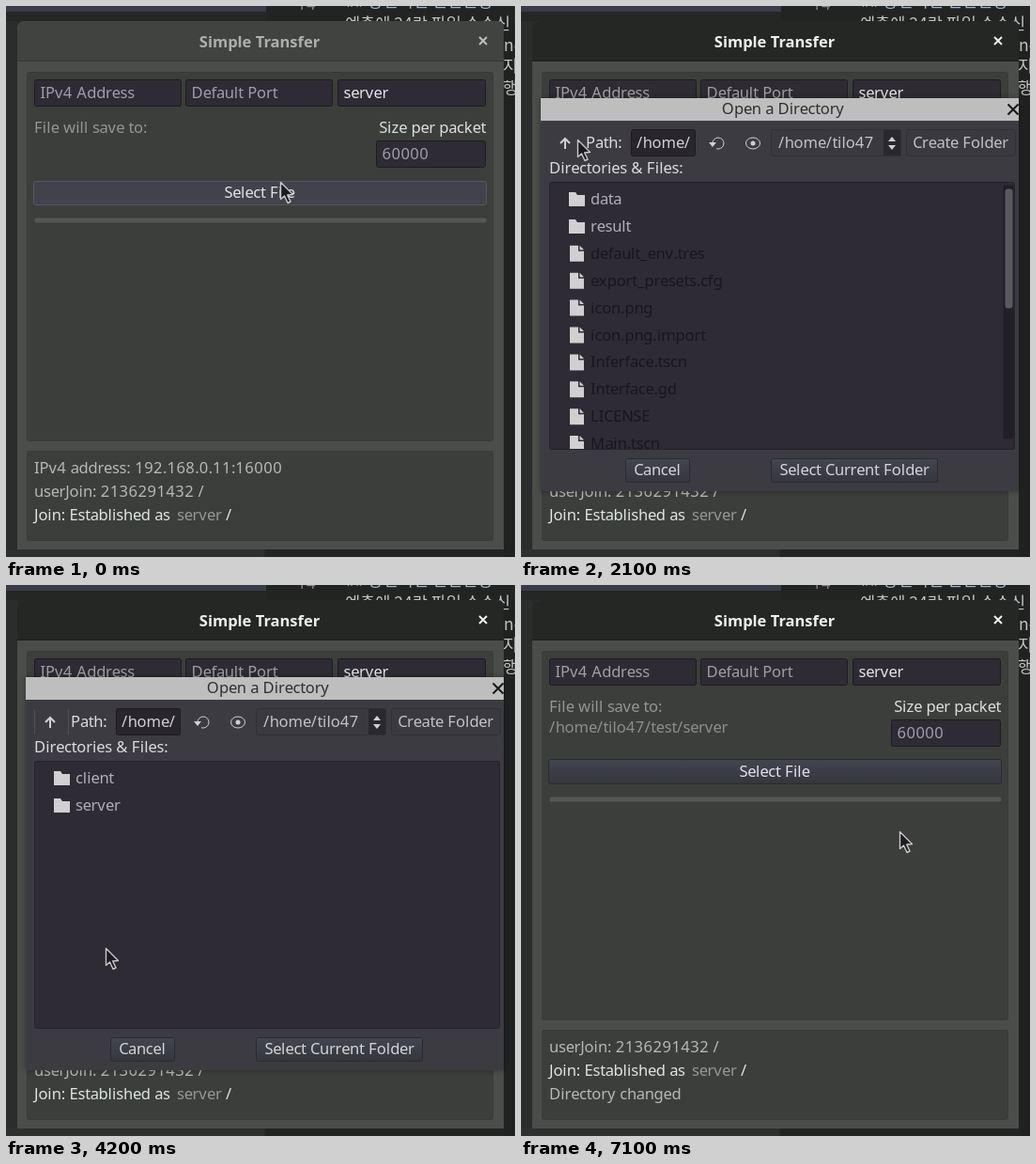
Write an HTML page with a canvas that moves like this. It is 542 px wide and 586 px high and loops after 7.2 s.

```html
<!DOCTYPE html>
<html lang="en">
<head>
<meta charset="utf-8">
<title>Simple Transfer</title>
<style>
html, body { margin: 0; width: 542px; height: 586px; overflow: hidden; background: #252727; }
canvas { display: block; }
</style>
</head>
<body>
<canvas id="stage" width="542" height="586"></canvas>
<script>
const c = document.getElementById('stage').getContext('2d');
const LOOP = 7200, STEP = 100, ROW = 28.9;
const FACE = '"Noto Sans", "Open Sans", sans-serif';
const CJK = '17.5px "Noto Sans CJK KR", "Noto Sans CJK", sans-serif';
const HINT_SIZE = 15, ZOOM = 1.105;
const FONT = `500 ${HINT_SIZE * ZOOM}px ${FACE}`;
const USER = 'tilo47';
const OPEN = 600, CLOSE = 6600;

const projectItems = ['data', 'result', 'default_env.tres', 'export_presets.cfg', 'icon.png',
  'icon.png.import', 'Inferface.tscn', 'Interface.gd', 'LICENSE', 'Main.tscn'];
const homeItems = ['airCraftCarrierTable', 'Android', 'Arduino', 'cloud_sense_gas', 'Desktop',
  'Documents', 'Downloads', 'draw_scribble', 'ehh_transfer', 'GDSerialAsset', 'Music', 'Pictures',
  'Public', 'simple_transfer', 'sketchbook', 'Templates', 'test', 'Videos', 'WebSocket Minimal Demo'];
const testItems = ['client', 'server'];

// time, x, y of the pointer tip
const pointerPath = [
  [0, 292, 187], [900, 292, 187], [1100, 142, 186], [1600, 91, 142], [1700, 91, 142],
  [2300, 45, 142], [2600, 45, 142], [2900, 223, 347], [3400, 223, 347], [3800, 106, 386],
  [4200, 106, 386], [4600, 104, 215], [4700, 110, 218], [5200, 110, 218], [5400, 112, 226],
  [5600, 112, 226], [6200, 355, 485], [6600, 355, 485], [7100, 403, 262], [7200, 403, 262]
];

const clamp = v => Math.max(0, Math.min(1, v));
const mix = (a, b, k) => a + (b - a) * k;

function pointerAt(t) {
  const i = pointerPath.findIndex(p => p[0] > t);
  const [t0, x0, y0] = pointerPath[i - 1], [t1, x1, y1] = pointerPath[i];
  const k = (t - t0) / (t1 - t0);
  return [mix(x0, x1, k), mix(y0, y1, k)];
}

function rect(x, y, w, h, fill) {
  c.fillStyle = fill;
  c.fillRect(x, y, w, h);
}

function box(x, y, w, h, fill, edge, r = 2) {
  c.beginPath();
  c.roundRect(x + .5, y + .5, w - 1, h - 1, r);
  c.fillStyle = fill;
  c.fill();
  if (edge) {
    c.strokeStyle = edge;
    c.lineWidth = 1;
    c.stroke();
  }
}

function button(x, y, w, h) {
  const g = c.createLinearGradient(0, y, 0, y + h);
  g.addColorStop(0, '#44464f');
  g.addColorStop(1, '#34353d');
  box(x, y, w, h, g, '#2a2b31');
}

// y is the middle of the line
function plain(s, x, y, color, font, align = 'left') {
  c.font = font;
  c.textAlign = align;
  c.fillStyle = color;
  c.fillText(s, x, y + 6);
}

// Hinted interface text: whole-pixel advances at the base size, then zoomed
const advances = {};
function advance(ch) {
  if (!advances[ch]) {
    c.font = `${HINT_SIZE}px ${FACE}`;
    advances[ch] = Math.round(c.measureText(ch).width) * ZOOM;
  }
  return advances[ch];
}

function text(s, x, y, color, align = 'left') {
  const chars = [...s];
  const width = chars.reduce((sum, ch) => sum + advance(ch), 0);
  if (align === 'center') x -= width / 2;
  if (align === 'right') x -= width;
  for (const ch of chars) {
    plain(ch, x, y, color, FONT);
    x += advance(ch);
  }
}

function shape(points, fill) {
  c.beginPath();
  points.forEach(([x, y]) => c.lineTo(x, y));
  c.closePath();
  c.fillStyle = fill;
  c.fill();
}

function cross(x, y, r, color) {
  c.beginPath();
  c.moveTo(x - r, y - r); c.lineTo(x + r, y + r);
  c.moveTo(x + r, y - r); c.lineTo(x - r, y + r);
  c.strokeStyle = color;
  c.lineWidth = 2;
  c.stroke();
}

function clipped(x, y, w, h, draw) {
  c.save();
  c.beginPath();
  c.rect(x, y, w, h);
  c.clip();
  draw();
  c.restore();
}

function drawBackdrop() {
  const ink = '#c0c3c0';
  rect(0, 0, 542, 586, '#252727');
  rect(0, 0, 277, 6, '#3a3b48');
  rect(277, 0, 265, 586, '#222323');
  rect(0, 16, 12, 570, '#2b2d2c');
  rect(530, 16, 12, 570, '#202121');
  rect(0, 578, 275, 8, '#2e302f');
  text('14', 310, -2, '#858685');
  plain('## 상언적인 현언열성', 362, -5, '#9fb8d0', CJK);
  plain('예출에 24랑 파일 수수신', 361, 19, ink, CJK);
  plain('nd', 530, 42, ink, CJK);
  plain('지', 529, 64, ink, CJK);
  plain('행', 529, 87, ink, CJK);
}

function drawWindow(t, px, py) {
  const focus = clamp((t - 400) / 200);
  const shade = (a, b) => { const v = Math.round(mix(a, b, focus)); return `rgb(${v},${v + 2},${v})`; };
  c.beginPath();
  c.roundRect(12, 16, 518, 562, [7, 7, 0, 0]);
  c.fillStyle = '#4b4d4a';
  c.fill();
  c.beginPath();
  c.roundRect(12, 16, 518, 43, [7, 7, 0, 0]);
  c.fillStyle = shade(65, 37);
  c.fill();
  rect(12, 58, 518, 1, shade(54, 28));
  plain('Simple Transfer', 270, 37.5, shade(174, 238), `bold 16.5px ${FACE}`, 'center');
  cross(508, 37, 4, shade(190, 238));

  box(22, 70, 497, 393, '#3c3e3b', '#383a37');
  box(22, 473, 497, 96, '#3c3e3b', '#383a37');

  const field = (x, y, w, label, color) => {
    box(x, y, w, 29, '#2e2b34', '#1d1b20');
    text(label, x + 6.5, y + 14, color);
  };
  field(30, 78, 157, 'IPv4 Address', '#a09fa4');
  field(191, 78, 157, 'Default Port', '#a09fa4');
  field(353, 78, 158, 'server', '#e4e4e6');
  field(394, 143, 117, '60000', '#a09fa4');
  text('Size per packet', 511, 129, '#dedfde', 'right');
  text('File will save to:', 30, 129, '#949694');

  const done = t >= CLOSE;
  if (done) text(`/home/${USER}/test/server`, 30, 151, '#8c8e8c');

  const hover = px > 29 && px < 512 && py > 184 && py < 211 && !done;
  if (hover) box(29, 186, 483, 26, t >= OPEN - 100 ? '#373842' : '#41424c', '#53555e');
  else button(29, 185, 483, 27);
  text('Select File', 270, 198, '#e2e2e4', 'center');
  box(30, 225, 482, 6, '#555754', null, 2);

  let y = 491;
  if (!done) {
    text('IPv4 address: 192.168.0.11:16000', 30, y, '#b6b8b6');
    y += 25;
  }
  text('userJoin: 2136291432 /', 30, y, '#b6b8b6');
  text('Join: Established as', 30, y + 25, '#dfe5df');
  text('server', 182, y + 25, '#969896');
  text('/', 234, y + 25, '#dfe5df');
  if (done) text('Directory changed', 30, y + 50, '#b6b8b6');
}

function folderIcon(x, y) {
  shape([[x, y - 7], [x + 7, y - 7], [x + 9, y - 4], [x + 17, y - 4], [x + 17, y + 8], [x, y + 8]], '#d0d0d2');
}

function fileIcon(x, y) {
  shape([[x + 1, y - 8], [x + 10, y - 8], [x + 10, y - 2], [x + 16, y - 2], [x + 16, y + 9], [x + 1, y + 9]], '#d0d0d2');
  shape([[x + 11.5, y - 8], [x + 16, y - 3.5], [x + 11.5, y - 3.5]], '#d0d0d2');
}

function drawList(items, scroll, selected, grabber) {
  box(30, 187, 496, 285, '#2f2b34', '#25222a');
  clipped(31, 188, 494, 283, () => {
    items.forEach((name, i) => {
      const y = 205 + ROW * i - scroll;
      const isFile = items === projectItems && i > 1;
      if (i === selected) box(70, y - 12, 450, 26, '#3f3e44', '#57565c');
      (isFile ? fileIcon : folderIcon)(51, y);
      text(name, 74, y, isFile ? '#19171c' : i === selected ? '#e6e6e8' : '#b0afb4');
    });
    if (grabber) {
      box(513, 190, 12, 271, '#211f26', null);
      box(515, 194 + scroll * 100 / 273, 9, grabber, '#5a5960', null, 3);
    }
  });
}

function drawToolbar(t) {
  const ink = '#d0d0d2';
  if (t >= 2300 && t < 4700) {
    rect(30, 132, 1, 27, '#504f56');
    rect(66, 132, 1, 27, '#504f56');
  }
  c.strokeStyle = ink;
  c.lineWidth = 2;
  c.beginPath();
  c.moveTo(42, 146); c.lineTo(47, 141); c.lineTo(52, 146);
  c.moveTo(47, 141); c.lineTo(47, 152);
  c.stroke();
  text('Path:', 69, 145, '#dcdcde');
  box(117, 131, 69, 29, '#28252d', '#1d1b20');
  clipped(120, 132, 61, 27, () => text('/home/', 123, 145, ink));

  c.strokeStyle = ink;
  c.beginPath();
  c.arc(210, 146, 6, Math.PI, Math.PI * 2.6);
  c.stroke();
  shape([[200, 145], [208, 145], [204, 150]], ink);

  c.beginPath();
  c.ellipse(247, 146, 7.5, 6, 0, 0, Math.PI * 2);
  c.stroke();
  c.beginPath();
  c.arc(247, 146, 2.5, 0, Math.PI * 2);
  c.fillStyle = ink;
  c.fill();

  box(266, 131, 139, 29, '#3a393f', '#313037');
  text(`/home/${USER}`, 274, 145, '#c2c2c6');
  rect(386, 132, 18, 27, '#2a282f');
  shape([[391, 144], [395, 139], [399, 144]], ink);
  shape([[391, 148], [395, 153], [399, 148]], ink);
  box(410, 131, 117, 29, '#3a393f', '#313037');
  text('Create Folder', 468, 145, '#c2c2c6', 'center');
}

function drawDialog(t, px, py) {
  c.save();
  c.shadowColor = 'rgba(0,0,0,.35)';
  c.shadowBlur = 6;
  rect(21, 98, 509, 418, '#3c3b42');
  c.restore();
  rect(21, 98, 509, 24, '#bebebe');
  text('Open a Directory', 279, 109, '#303030', 'center');
  cross(524, 110, 5.5, '#18181a');
  drawToolbar(t);
  text('Directories & Files:', 30, 172, '#dcdcde');

  let selected = -1;
  if (t < 2600) {
    drawList(projectItems, 0, -1, 128);
  } else if (t < 4200) {
    if (t >= 3900) selected = 16;
    drawList(homeItems, 273 * clamp((t - 3000) / 400), selected, 108);
  } else {
    if (t >= 5400) selected = 1;
    drawList(testItems, 0, selected, 0);
  }

  const picked = selected >= 0;
  const [cancelX, x, w] = picked ? [121, 283, 152] : [111, 266, 178];
  const hover = px > x && px < x + w && py > 480 && py < 506;
  button(cancelX, 481, 69, 26);
  text('Cancel', cancelX + 34, 493, '#d4d4d6', 'center');
  button(x, 481, w, 26);
  if (hover) {
    box(x, 481, w, 26, '#34333b', '#0e0d10');
    box(x + 1, 482, w - 2, 24, 'transparent', '#606068');
  }
  text(picked ? 'Select This Folder' : 'Select Current Folder', x + w / 2, 493, hover ? '#ececee' : '#d4d4d6', 'center');
}

function drawPointer(x, y) {
  c.save();
  c.translate(Math.round(x) + .5, Math.round(y) + .5);
  shape([[0, 0], [0, 18], [4, 14.5], [7.5, 22], [10.5, 20.5], [7.2, 13.5], [13, 13]], '#1d1c20');
  c.lineJoin = 'round';
  c.strokeStyle = '#c8c8c8';
  c.lineWidth = 1.4;
  c.stroke();
  c.restore();
}

function frame() {
  const t = Math.floor(performance.now() % LOOP / STEP) * STEP;
  const [px, py] = pointerAt(t);
  drawBackdrop();
  drawWindow(t, px, py);
  if (t >= OPEN && t < CLOSE) drawDialog(t, px, py);
  drawPointer(px, py);
  requestAnimationFrame(frame);
}
frame();
</script>
</body>
</html>
```
